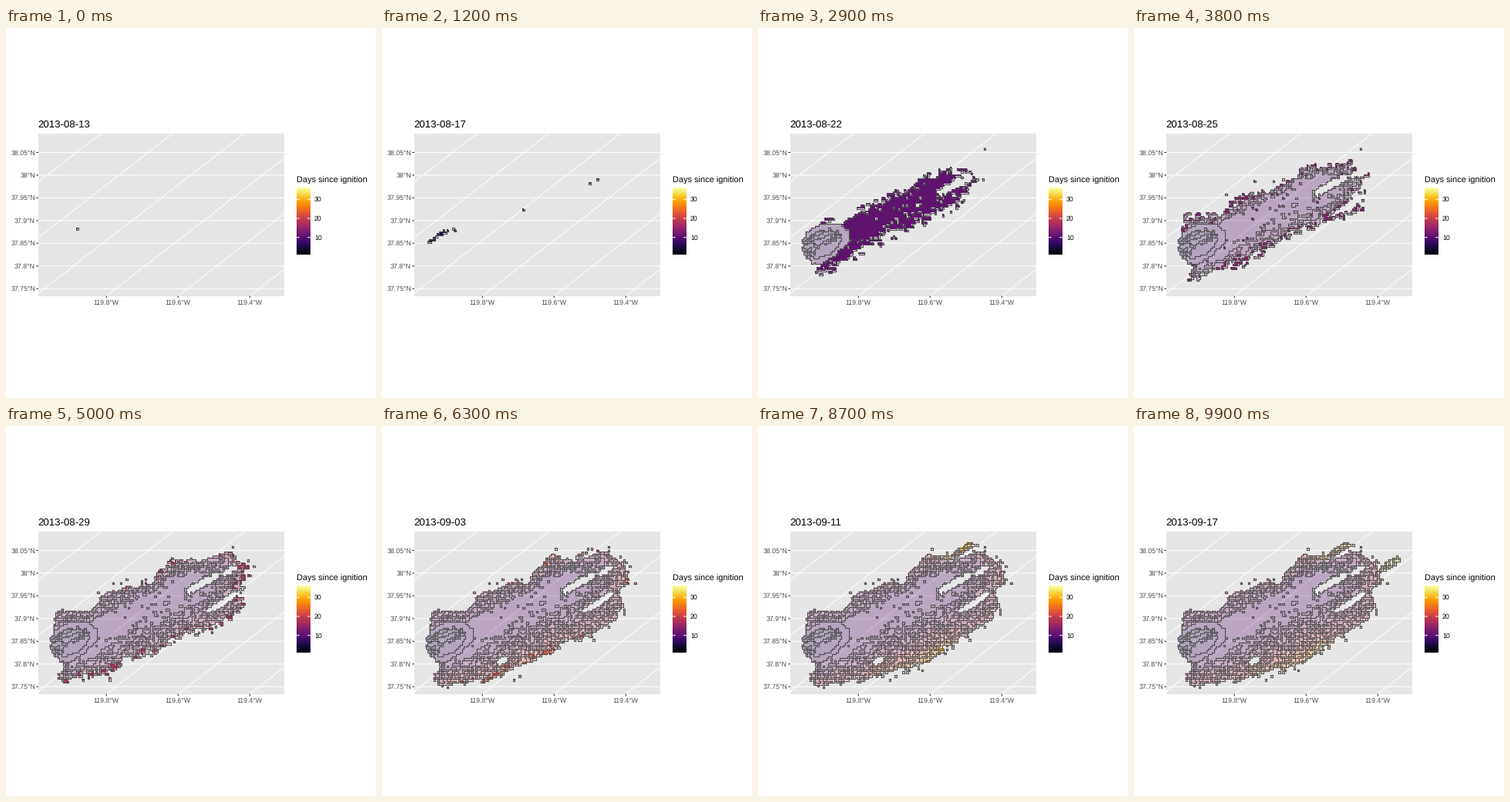
A matplotlib script for the animation above (10 s loop, 480 by 480 pixels).

```python
import numpy as np
import matplotlib.pyplot as plt
from matplotlib.animation import FuncAnimation
from matplotlib.collections import LineCollection
from matplotlib.path import Path

plt.rcParams["font.family"] = "Liberation Sans"
plt.rcParams["text.hinting"] = "none"
SIZE, DPI = 480, 100
PX = 72 / DPI
LEFT, RIGHT, TOP, BOTTOM = 42, 361, 137, 347.5
CELL, X0, Y0, NX, NY = 2.46, 54.37, 143.65, 119, 80
NEVER = 99
cmap = plt.get_cmap("inferno")

# Final fire edge: x, y and the day the fire gets there.
EDGE = np.array([
    (56, 288, 11), (62, 263, 11), (66, 240, 12), (108, 240, 13), (126, 221, 15), (150, 210, 15),
    (173, 202, 20), (190, 206, 13), (195, 192, 17), (218, 166, 20), (248, 167, 28),
    (276, 149, 28), (278, 158, 24), (222, 188, 13), (262, 171, 14), (290, 162, 17),
    (314, 180, 17), (321, 204, 23), (303, 211, 17), (312, 234, 18), (300, 252, 18),
    (262, 274, 20), (243, 290, 29), (216, 308, 29), (137, 327, 21), (76, 337, 20),
    (66, 326, 16), (76, 312, 12)])
RUN = (75, 288), (240, 192)
IGNITION = 92.5, 260.5


def smooth(noise):
    """Blur noise along the wind and scale it to unit spread."""
    s = sum(np.roll(noise, (-round(0.6 * k), k), (0, 1)) for k in range(-3, 4))
    return s / s.std()


def ellipse(x, y, cx, cy, length, width, slope=0.6):
    """Distance from the centre of a tilted ellipse, 1 at its rim, and the offset across it."""
    c, s = 1 / np.hypot(1, slope), slope / np.hypot(1, slope)
    along = ((x - cx) * c - (y - cy) * s) / length
    across = ((x - cx) * s + (y - cy) * c) / width
    return np.hypot(along, across), across


def nearest(x, y, points):
    d = np.hypot(x[..., None] - points[:, 0], y[..., None] - points[:, 1])
    return d.min(-1), d.argmin(-1)


def cell_at(x, y):
    return int((y - Y0) // CELL), int((x - X0) // CELL)


def burn_days():
    rng = np.random.default_rng(13)
    x, y = np.meshgrid(X0 + CELL * (np.arange(NX) + 0.5), Y0 + CELL * (np.arange(NY) + 0.5))
    blur = [smooth(rng.normal(size=x.shape)) for _ in range(3)]
    jx, jy = x + 1.1 * blur[0], y + 1.1 * blur[1]

    # The fire races along the run, then creeps out to its edge.
    n = len(EDGE)
    t = np.linspace(0, n, 10 * n)
    rim = np.column_stack([np.interp(t, np.arange(n + 1), np.append(col, col[0]))
                           for col in EDGE.T])
    to_run, _ = nearest(jx, jy, np.linspace(*RUN, 60))
    to_rim, i = nearest(jx, jy, rim)
    part = to_run / (to_run + 0.6 * to_rim)
    final = rim[i, 2]
    days = np.ceil(8 + (final - 8) * part ** 4 + 1.3 * part * blur[2])
    days = np.clip(days, 9, 35).astype(int)

    # Runs of neighbouring cells burn together; a few lag behind.
    for axis in (1, 0, 1):
        days = np.where(rng.random(x.shape) < 0.35, np.roll(days, 1, axis), days)
    days = np.where(rng.random(x.shape) < 0.02, np.minimum(days + 3, 35), days)

    where = np.column_stack([jx.ravel(), jy.ravel()])
    inside = Path(EDGE[:, :2]).contains_points(where).reshape(x.shape)
    sparks = (to_rim < 9) & (final > 13) & (rng.random(x.shape) < 0.05)
    days[~inside & ~sparks] = NEVER

    # Unburned islands and a late patch in the far north-east.
    for island in [(254, 204, 27, 5), (281, 228, 27, 5), (290, 187, 13, 3.5), (155, 305, 10, 5)]:
        days[ellipse(jx, jy, *island)[0] < 1] = NEVER
    patch = ellipse(jx, jy, 332, 179, 15, 4.5)[0] < 1
    days[patch] = rng.integers(31, 36, patch.sum())

    # Slow first week around the ignition point.
    r, across = ellipse(jx, jy, 83, 280, 26, 16, 0.5)
    days[(r < 1.45) & inside] = 8
    week = np.clip(np.round(6.3 + 2 * across + 0.5 * blur[2]), 4, 7).astype(int)
    days[r < 1] = week[r < 1]

    # Embers thrown ahead by the wind.
    for ex in rng.uniform(176, 296, 12):
        spot = cell_at(ex, 222 - 0.32 * (ex - 176) + rng.normal(0, 12))
        days[spot] = min(days[spot], rng.integers(4, 7))
    days[cell_at(*IGNITION)] = 0
    days[days == 33] = 34
    return days


def cell_edges(days):
    """Edges between cells of different days, with the day each one appears."""
    segs, seen = [], []
    d = np.pad(days, 1, constant_values=NEVER)
    for axis, (dx, dy) in enumerate([(1, 0), (0, 1)]):
        a, b = (d[:-1], d[1:]) if axis == 0 else (d[:, :-1], d[:, 1:])
        for r, c in np.argwhere(a != b):
            x, y = X0 + (c - dx) * CELL, Y0 + (r - dy) * CELL
            segs.append([(x, y), (x + dx * CELL, y + dy * CELL)])
            seen.append(min(a[r, c], b[r, c]))
    return np.array(segs), np.array(seen)


def shade(day):
    return cmap(np.asarray(day) / 35)


def date_text(day):
    return f"2013-08-{13 + day}" if day < 19 else f"2013-09-{day - 18:02}"


fig = plt.figure(figsize=(SIZE / DPI, SIZE / DPI), dpi=DPI, facecolor="white")
ax = fig.add_axes([0, 0, 1, 1])
ax.axis("off")


def line(xs, ys, color, z=1):
    return ax.plot(xs, ys, color=color, lw=1.07 * PX, zorder=z,
                   solid_capstyle="butt", snap=False)[0]


def label(x, y, text, size, color="black", **kw):
    return ax.text(x, y, text, fontsize=size * PX, color=color, **kw)


panel = plt.Rectangle((LEFT, TOP), RIGHT - LEFT, BOTTOM - TOP, fc="#e6e6e6", lw=0, zorder=0)
ax.add_patch(panel)

for i in range(7):
    y = 161.5 + 29.45 * i
    line([LEFT, RIGHT], [y, y], "white")
    line([LEFT - 2.7, LEFT], [y, y], "#333333")
    label(38, y + 3, f"{38.05 - 0.05 * i:.4g}°N", 8.8, "#4d4d4d", ha="right")

for i in range(6):
    x = 123 + 93 * i
    line([x, x - 271.5], [TOP, BOTTOM], "white").set_clip_path(panel)

for i in range(3):
    x = 130.3 + 93 * i
    line([x, x], [BOTTOM, BOTTOM + 2.7], "#333333")
    label(x, 359, f"{119.8 - 0.2 * i:.1f}°W", 8.8, "#4d4d4d", ha="center")

BAR = 377.3, 394.6, 293.8, 207.6
label(377, 201, "Days since ignition", 11)
ax.imshow(np.linspace(1, 0, 256)[:, None], cmap=cmap, aspect="auto", extent=BAR, zorder=1)
for n in (10, 20, 30):
    y = np.interp(n, (1, 36), BAR[2:])
    line([BAR[0], BAR[0] + 3.4], [y, y], "white", 2)
    line([BAR[1] - 3.4, BAR[1]], [y, y], "white", 2)
    label(400, y + 3, str(n), 8.8)

title = label(41.4, 129, "", 13.2)

DAYS = burn_days()
SEGS, SEEN = cell_edges(DAYS)
PAST = shade(DAYS)
PAST[..., 3] = 0.3

fill = ax.imshow(np.zeros((NY, NX, 4)), interpolation="nearest", aspect="auto", zorder=3,
                 extent=(X0, X0 + NX * CELL, Y0 + NY * CELL, Y0))
edges = LineCollection([], colors="#4d4d4d", linewidths=1.07 * PX,
                       capstyle="projecting", zorder=4)
ax.add_collection(edges)
ax.set_xlim(0, SIZE)
ax.set_ylim(SIZE, 0)

# Each day is held, then its colour moves half way to the next day's.
states = [d for d in range(36) if d != 33]
timeline = []
for i, day in enumerate(states):
    timeline += [(day, day)] * (2 if i < 31 else 1)
    if i + 1 < len(states):
        timeline.append((day, (day + states[i + 1]) / 2))


def draw(frame):
    day, tint = timeline[frame]
    img = PAST.copy()
    img[DAYS > day] = 0
    img[DAYS == day] = shade(tint)
    fill.set_data(img)
    edges.set_segments(SEGS[SEEN <= day])
    title.set_text(date_text(day))
    return fill, edges, title


anim = FuncAnimation(fig, draw, frames=len(timeline), interval=100, repeat=True)
plt.show()
```
